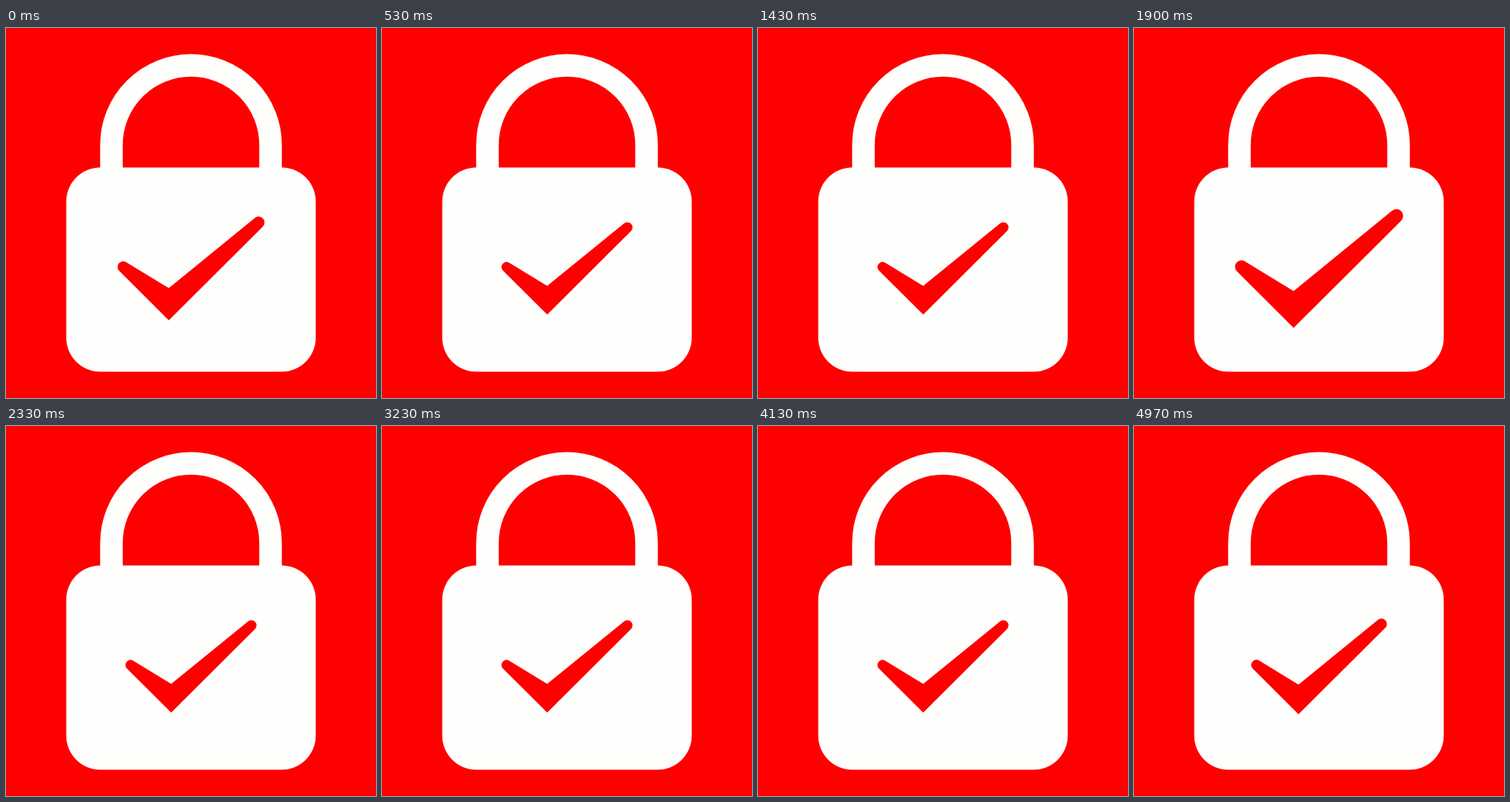
Recreate the animation shown at these times as an HTML page. Size 500 px wide and 500 px high, loop 5010 ms.

```html
<!DOCTYPE html>
<html lang="en">
<head>
<meta charset="utf-8">
<title>Secure lock</title>
<style>
  html, body { margin: 0; width: 100%; height: 100%; overflow: hidden; background: #f00; }
  svg { display: block; width: 100vw; height: 100vh; }
</style>
</head>
<body>
<svg viewBox="0 0 500 500">
  <path d="M142.5 195V158a107.5 107.5 0 0 1 215 0V195" fill="none" stroke="#fefefc" stroke-width="30.5"/>
  <rect x="81.4" y="188.5" width="337.2" height="276" rx="46" fill="#fefefc"/>
  <path id="check" fill="#f00" d="M162 316.2L220 351.5L335.9 257.1A7.9 7.9 0 0 1 347 268.5L220 395L152.6 327.8A7.6 7.6 0 0 1 162 316.2Z"/>
</svg>
<script>
  const LOOP = 5010, LAST = 149, BEAT = 27;
  const check = document.getElementById('check');

  // Steps run at 30 per second, with their starts rounded to 10 ms.
  const stepAt = ms => Math.min(LAST, Math.floor(0.3 * Math.floor(ms / 10) + 0.15));

  // The mark rests at full size on the first step, then pulses.
  const scaleAt = step => step === 0
    ? 1
    : 1.016 - 0.131 * Math.cos((step - 17.35) / BEAT * 2 * Math.PI);

  const start = performance.now();

  function draw() {
    const ms = Math.max(0, performance.now() - start) % LOOP;
    const s = scaleAt(stepAt(ms));
    check.setAttribute('transform', `translate(250 324.5) scale(${s}) translate(-250 -324.5)`);
    requestAnimationFrame(draw);
  }
  draw();
</script>
</body>
</html>
```
